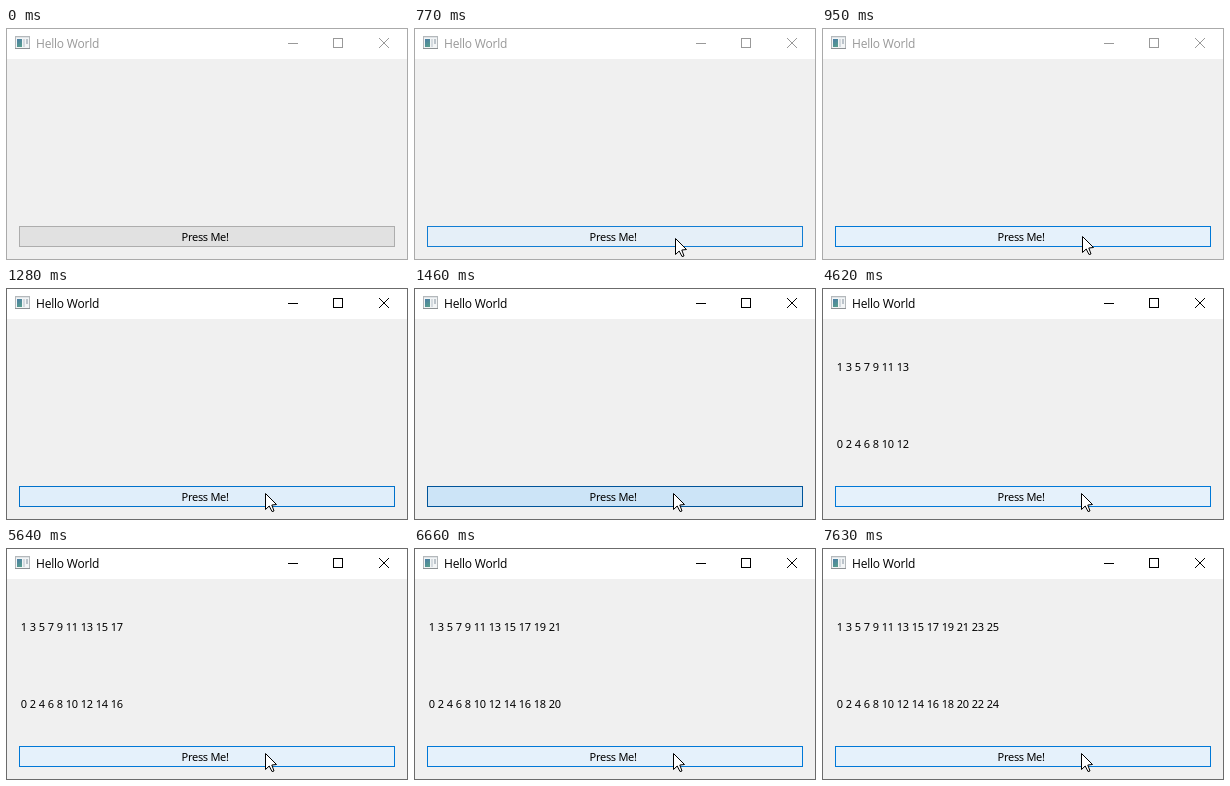
Animation of 402x232 px, one loop 8 s. Source, as an HTML page with a canvas:

```html
<!DOCTYPE html>
<html lang="en">
<head>
<meta charset="utf-8">
<title>Hello World</title>
<style>
html, body { margin: 0; width: 100%; height: 100%; overflow: hidden; background: #f0f0f0; }
canvas { display: block; }
</style>
</head>
<body>
<canvas id="stage" width="402" height="232"></canvas>
<script>
const ctx = document.getElementById('stage').getContext('2d');
const LOOP = 8000, ENTER = 360, HOVER = 500, PRESS = 1280, RELEASE = 1560;
const TICK = 505, REFRESH = 51;
const UI_FONT = '11px "Noto Sans", "Open Sans", sans-serif';
const TITLE_FONT = '12px "Open Sans", "Noto Sans", sans-serif';

// Button looks: fill, then border, as RGB.
const NORMAL = [[225, 225, 225], [173, 173, 173]];
const HOT = [[229, 241, 251], [0, 120, 215]];
const DOWN = [[204, 228, 247], [0, 84, 153]];

const clamp = v => Math.max(0, Math.min(1, v));
const progress = (t, from, to) => clamp((t - from) / (to - from));
const mix = (a, b, k) => a + (b - a) * k;
const mixColor = (a, b, k) => `rgb(${a.map((v, i) => Math.round(mix(v, b[i], k))).join()})`;

function box(x, y, w, h, fill) {
  ctx.fillStyle = fill;
  ctx.fillRect(x, y, w, h);
}

function frame(x, y, w, h, color) {
  ctx.strokeStyle = color;
  ctx.lineWidth = 1;
  ctx.strokeRect(x + .5, y + .5, w - 1, h - 1);
}

function text(str, x, y, font, color, spacing) {
  ctx.font = font;
  ctx.letterSpacing = spacing;
  ctx.fillStyle = color;
  ctx.fillText(str, x, y);
}

function drawIcon() {
  box(9, 8, 15, 13, '#b4b8bb');
  box(10, 9, 13, 1, '#dfe3e6');
  box(10, 10, 13, 10, '#f3f5f6');
  const glow = ctx.createLinearGradient(11, 11, 16, 19);
  glow.addColorStop(0, '#4a7ca4');
  glow.addColorStop(1, '#58a08c');
  box(11, 11, 5, 8, glow);
  box(17, 11, 2, 8, '#d5dbe0');
  box(20, 11, 2, 5, '#bcc4cb');
  box(9, 20, 15, 1, '#8d9194');
}

function drawWindow(active) {
  const ink = active ? '#000' : '#999';
  box(0, 0, 402, 232, '#f0f0f0');
  box(0, 0, 402, 31, '#fff');
  drawIcon();
  text('Hello World', 30, 20, TITLE_FONT, ink, '-0.2px');
  box(282, 15, 10, 1, ink);
  frame(327, 10, 10, 10, ink);
  ctx.strokeStyle = ink;
  ctx.beginPath();
  ctx.moveTo(373, 10);
  ctx.lineTo(383, 20);
  ctx.moveTo(383, 10);
  ctx.lineTo(373, 20);
  ctx.stroke();
  frame(0, 0, 402, 232, active ? '#6b6b6b' : '#aaa');
}

function drawButton(t) {
  let from = NORMAL, to = HOT, k = progress(t, HOVER, 800);
  if (t >= RELEASE) [from, to, k] = [DOWN, HOT, progress(t, RELEASE - 40, 1660)];
  else if (t >= PRESS) [from, to, k] = [HOT, DOWN, progress(t, PRESS - 40, 1450)];
  const [fill, border] = from.map((c, i) => mixColor(c, to[i], k));
  box(13, 198, 376, 21, fill);
  frame(13, 198, 376, 21, border);
  text('Press Me!', 175.6, 213, UI_FONT, '#000', '-0.3px');
}

// Six pixels per digit and three per space.
function drawRow(first, count, y) {
  let x = 14.7;
  for (let i = 0; i < count; i++) {
    const word = String(first + 2 * i);
    text(word, x, y, UI_FONT, '#000', '-0.29px');
    x += word.length * 6 + 3;
  }
}

function drawCursor(t) {
  if (t < ENTER) return;
  const k = 1 - (1 - progress(t, ENTER - 46, 930)) ** 2;
  const settle = progress(t, 1010, 1100);
  const x = Math.round(mix(280, 260, k) - settle);
  const y = Math.round(mix(232, 208, k) - 3 * settle);
  const outline = [[0, 0], [0, 16], [3.7, 12.5], [6.5, 18], [8.5, 17.5], [6.3, 11.5], [11, 11]];
  ctx.beginPath();
  outline.forEach(([dx, dy]) => ctx.lineTo(x + dx + .5, y + dy + .5));
  ctx.closePath();
  ctx.fillStyle = '#fff';
  ctx.fill();
  ctx.strokeStyle = '#000';
  ctx.lineWidth = 1;
  ctx.stroke();
}

// Numbers arrive on a steady tick but show at the next screen refresh.
function numberCount(t) {
  const shown = Math.floor((t - RELEASE) / REFRESH) * REFRESH;
  return Math.floor(shown / TICK) + 1;
}

function draw(now) {
  const t = now % LOOP;
  const count = numberCount(t);
  drawWindow(t >= PRESS);
  drawButton(t);
  drawRow(1, count, 83);
  drawRow(0, count, 160);
  drawCursor(t);
}

const start = performance.now();
function tick() {
  draw(performance.now() - start);
  requestAnimationFrame(tick);
}
tick();
</script>
</body>
</html>
```
